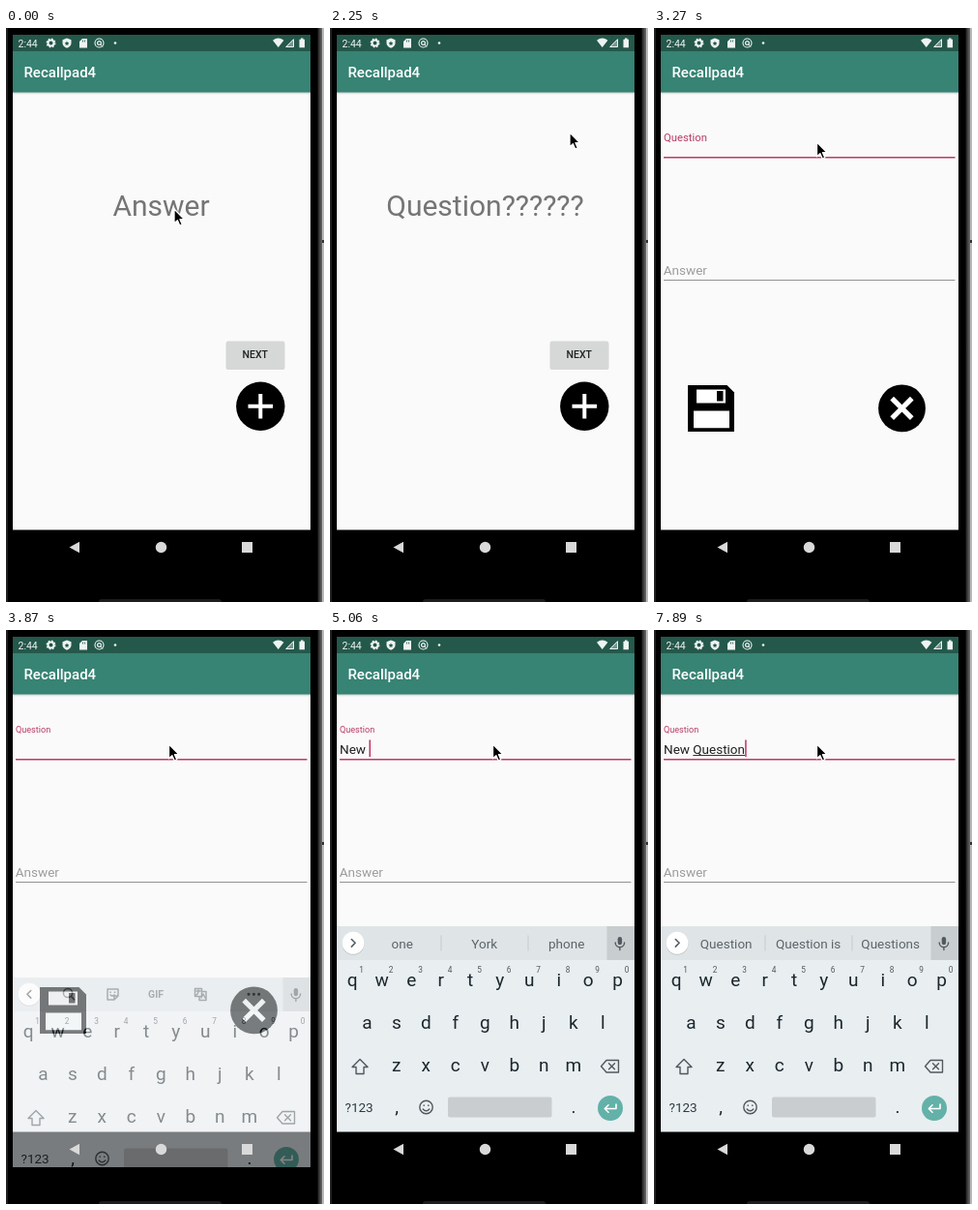
Animation, 329 px wide and 593 px high, one loop 8 s. Source, as an HTML page:

```html
<!DOCTYPE html>
<html lang="en">
<head>
<meta charset="utf-8">
<title>Card app demo</title>
<style>
  html, body { margin: 0; width: 100%; height: 100%; overflow: hidden; background: #000; }
  svg { display: block; width: 100%; height: 100%; }
  text { font-family: Roboto, "Noto Sans", sans-serif; white-space: pre; }
  .mid { text-anchor: middle; }
  .field { font-size: 13.5px; }
  .line { fill: none; stroke-linecap: round; stroke-linejoin: round; }
</style>
</head>
<body>
<svg viewBox="0 0 329 593">
  <defs>
    <clipPath id="screen"><rect x="7" y="7" width="308" height="548"/></clipPath>
    <linearGradient id="shade" x2="0" y2="1">
      <stop offset="0" stop-color="#000" stop-opacity=".2"/>
      <stop offset="1" stop-color="#000" stop-opacity="0"/>
    </linearGradient>
    <linearGradient id="edge">
      <stop offset="0" stop-color="#1c1c1c"/>
      <stop offset="1" stop-color="#6a6a6a"/>
    </linearGradient>
    <g id="window">
      <rect x="7" y="7" width="308" height="548"/>
      <rect x="7" y="24" width="308" height="494.5" fill="#fafafa"/>
      <rect x="7" y="66" width="308" height="3" fill="url(#shade)"/>
      <rect x="7" y="7" width="308" height="17.5" fill="#24584b"/>
      <rect x="7" y="24" width="308" height="42.5" fill="#378374"/>
      <text x="18.5" y="51.3" font-size="15" font-weight="500" fill="#fff">Recallpad4</text>
    </g>
  </defs>

  <!-- phone body -->
  <rect width="329" height="593"/>
  <rect width="2" height="593" fill="#1e1e1e"/>
  <rect x="322.5" width="4.5" height="593" fill="url(#edge)"/>
  <rect x="327" width="2" height="593" fill="#b8b8b8"/>
  <rect x="327" y="219" width="2" height="3" fill="#333"/>
  <rect x="96" y="590" width="127" height="8" rx="3" fill="#1c1c1c"/>

  <g clip-path="url(#screen)">
    <g id="cardView">
      <use href="#window"/>
      <text id="card" class="mid" x="160.5" y="194" font-size="30" fill="#757575"></text>
      <rect x="227.5" y="324" width="61" height="29" rx="2" fill="#000" opacity=".14"/>
      <rect x="228" y="323.5" width="60" height="28" rx="1.5" fill="#d6d7d7"/>
      <text class="mid" x="257.7" y="341.3" font-size="10.5" font-weight="500" fill="#212121">NEXT</text>
      <circle cx="263.3" cy="390.8" r="25.2"/>
      <path d="M250.5 390.8h25.6M263.3 378v25.6" stroke="#fff" stroke-width="4"/>
    </g>

    <g id="formView">
      <use href="#window"/>
      <path id="rule" d="M10 133.7H311.5"/>
      <text id="label" x="10">Question</text>
      <text id="typed" class="field" x="10" y="127.5" fill="#212121"></text>
      <path id="under" stroke="#212121" stroke-width=".9"/>
      <rect id="caret" y="113.5" width="1.5" height="17.5" fill="#c03363"/>
      <text class="field" x="9.8" y="254.7" fill="#9d9d9d">Answer</text>
      <path d="M10 260.5H311.5" stroke="#929292"/>
      <path d="M35 369H75.5L83 376.500V417H35Z"/>
      <path d="M44 373.500H74V387.500H44ZM41 395.500H78V413.300H41Z" fill="#fff"/>
      <rect x="65" y="375" width="6.500" height="10.500"/>
      <circle cx="256.500" cy="392.900" r="24.400"/>
      <path d="M246.200 382.600l20.600 20.600M266.800 382.600l-20.600 20.600" stroke="#fff" stroke-width="5.200"/>
    </g>

    <g id="keyboard">
      <rect x="7" y="306" width="308" height="270" fill="#e9eef1"/>
      <rect x="7" y="306" width="308" height="35" fill="#dfe4e7"/>
      <rect x="286.5" y="306" width="28.5" height="35" fill="#c8cdd0"/>
      <circle cx="24" cy="324" r="11.6" fill="#b9bec1"/>
      <circle cx="24" cy="323.3" r="11.5" fill="#fff"/>
      <path id="chevron" class="line" stroke="#555d62" stroke-width="1.6"/>
      <g fill="#525a5f">
        <rect x="297.7" y="317" width="4.4" height="8.2" rx="2.2"/>
        <path class="line" d="M295.2 323a4.7 4.7 0 0 0 9.4 0M299.9 328v2.5" stroke="#525a5f" stroke-width="1.4"/>
      </g>

      <g id="tools" class="line" stroke="#5f686d" stroke-width="1.5">
        <circle cx="64" cy="322" r="4.6"/><path d="M67.5 325.5l3.2 3.5"/>
        <path d="M105 318h11v7l-4 4h-7ZM112 329v-4h4M108 321v.5M112.5 321v.5M108 324q2 2 4 0"/>
        <path d="M195.5 317.5h7v8h-7ZM202.5 320.5h4.5v9h-7v-4M197 320h4M199 319v1q0 3-2 4M202 327l2-4 2 4"/>
        <path d="M251 323.3h.1M256.3 323.3h.1M261.6 323.3h.1" stroke-width="3"/>
        <text class="mid" x="155" y="327" font-size="10.5" font-weight="700" fill="#5f686d" stroke="none">GIF</text>
      </g>

      <g id="strip">
        <path d="M115 315.5v16M205 315.5v16" stroke="#c5cbce"/>
        <text class="mid field" x="74.7" y="328.5" fill="#5c656a"></text>
        <text class="mid field" x="159.7" y="328.5"></text>
        <text class="mid field" x="244.7" y="328.5" fill="#5c656a"></text>
      </g>

      <g id="keys"></g>

      <g class="line" stroke="#4f595e" stroke-width="1.4">
        <path d="M31 443.5l8 8h-4v7h-8v-7h-4Z"/>
        <path d="M286 444.5h12.5v12.5H286l-5.5-6.2ZM288.5 447.7l6 6M294.5 447.7l-6 6"/>
        <circle cx="99.5" cy="493" r="6.7"/>
        <path d="M97.2 491v.4M101.8 491v.4M96.2 495q3.3 3.5 6.6 0"/>
      </g>
      <text x="15.5" y="498" font-size="13.5" fill="#2c383f">?123</text>
      <rect x="122" y="482.5" width="107.5" height="21" rx="2" fill="#c9cdcf"/>
      <circle cx="290" cy="494" r="13" fill="#63b1a8"/>
      <path class="line" d="M296 490v4.5H284.5M288 490.8l-3.7 3.7 3.7 3.7" stroke="#fff" stroke-width="1.6"/>
    </g>
  </g>

  <rect id="navBack" x="7" y="518.5" width="308" height="37"/>
  <g fill="#d9d9d9">
    <path d="M65.5 536.5L76 530.7V542.3Z"/>
    <circle cx="160.5" cy="536.5" r="5.7"/>
    <rect x="244" y="531" width="11" height="11"/>
  </g>

  <!-- status icons -->
  <g fill="#eef4f2">
    <text x="12.5" y="19.5" font-size="10.5">2:44</text>
    <circle cx="46.5" cy="15.5" r="3" fill="none" stroke="#eef4f2" stroke-width="2"/>
    <circle cx="46.5" cy="15.5" r="4.3" fill="none" stroke="#eef4f2" stroke-width="1.3" stroke-dasharray="1.7 1.677"/>
    <path d="M63 10.5l4.5 1.7v3.3q0 3.5-4.5 5.2-4.5-1.7-4.5-5.2v-3.3Z"/>
    <path d="M63 13.5l.8 1.5 1.6.2-1.2 1.2.3 1.7-1.5-.8-1.5.8.3-1.7-1.2-1.2 1.6-.2Z" fill="#24584b"/>
    <path d="M79 11h5v9.5h-8V14Z"/>
    <path d="M79.5 12.5v2M81.5 12.5v2" stroke="#24584b" stroke-width=".8"/>
    <circle cx="96.5" cy="15.5" r="4.5" fill="none" stroke="#eef4f2" stroke-width="1.1"/>
    <circle cx="96.5" cy="15.5" r="1.9" fill="none" stroke="#eef4f2" stroke-width="1.2"/>
    <path d="M98 17l2 2.5" stroke="#eef4f2"/>
    <circle cx="113" cy="15.5" r="1.3"/>
    <path d="M276 12.7q5.7-4.3 11.4 0L281.7 20Z"/>
    <path d="M298 10.8V20h-9.2Z" opacity=".4"/>
    <path d="M289.8 19.5l7.7-7.7v7.7Z" fill="none" stroke="#eef4f2"/>
    <path d="M303.5 11.7h1.5v-1.2h2.5v1.2h1.5v8.6h-5.5Z"/>
  </g>

  <path id="pointer" d="M0 0V14.8L3.4 11.7 5.7 17 8.3 15.9 6 10.7H10.6Z"
        stroke="#fff" stroke-width="1.3" stroke-linejoin="round"/>
</svg>

<script>
const LOOP = 8000, STEP = 148;
const $ = id => document.getElementById(id);
const set = (node, attrs) => { for (const k in attrs) node.setAttribute(k, attrs[k]); };
const show = (node, on) => { node.style.display = on ? '' : 'none'; };
const mix = (a, b, p) => a + (b - a) * p;

// Latest entry whose time has come: [time, value]
const at = (track, t) => track.reduce((v, e) => (e[0] <= t ? e[1] : v), track[0][1]);

// Pointer legs: start time, steps, destination
const legs = [[600, 6, 267, 374], [2100, 2, 248, 108], [2400, 2, 205, 126], [2690, 4, 168.5, 118]];

// Window scales during the screen change: [old, new]
const scales = [[0, [1, 0]], [2400, [1.04, 0.97]], [2550, [1.05, 0.995]], [2690, [1, 1]]];

const floatLabel = [[0, 0], [3270, 0.5], [3420, 1]];

// Text before the composing word, then the word itself
const typing = [
  [0, ['', '']], [4310, ['', 'N']], [4760, ['', 'Ne']], [4910, ['', 'New']], [5060, ['New ', '']],
  [6250, ['New ', 'Q']], [6700, ['New ', 'Qu']], [6990, ['New ', 'Que']], [7140, ['New ', 'Ques']],
  [7440, ['New ', 'Quest']], [7590, ['New ', 'Questi']], [7740, ['New ', 'Questio']], [7890, ['New ', 'Question']]
];

// Three suggestions; a leading * marks the bold one
const hints = [
  [0, ''], [4460, 'N|No|Not'], [4760, 'Ne|New|Need'], [4910, 'New|News|Never'], [5060, 'one|York|phone'],
  [6400, 'Q|Quote|Question'], [6840, 'Qu|*Quote|Question'], [7140, 'Ques|*Question|Questions'],
  [7440, 'Quest|*Question|Questions'], [7740, 'Questio|*Question|Questions'],
  [7890, 'Question|Question is|Questions']
];

const caretOn = [[0, 0], [3420, 1], [3870, 0], [4310, 1], [5510, 0], [5950, 1]];

function key(ch, x, y, size = 19, fill = '#1b272d') {
  return `<text class="mid" x="${x}" y="${y}" font-size="${size}" fill="${fill}">${ch}</text>`;
}

function buildKeys() {
  const rows = [['qwertyuiop', 23.2, 368], ['asdfghjkl', 38.3, 411.5], ['zxcvbnm', 68.8, 456]];
  let out = key(',', 69, 498.5) + key('.', 252, 498.5);
  for (const [chars, x, y] of rows)
    [...chars].forEach((ch, i) => {
      out += key(ch, x + 30.5 * i, y);
      if (y < 400) out += key((i + 1) % 10, x + 9.3 + 30.5 * i, 353.7, 8.3, '#4f595e');
    });
  $('keys').innerHTML = out;
}

function movePointer(t) {
  let x = 174, y = 187;
  for (const [start, steps, toX, toY] of legs) {
    if (t < start) break;
    const p = Math.min(steps, Math.floor((t - start) / STEP) + 1) / steps;
    const e = p * (2 - p);
    x = mix(x, toX, e);
    y = mix(y, toY, e);
  }
  set($('pointer'), { transform: `translate(${x} ${y})` });
}

function zoom(node, s) {
  set(node, { transform: `translate(161 281) scale(${s}) translate(-161 -281)` });
}

function drawWindows(t) {
  const [oldScale, newScale] = at(scales, t);
  show($('cardView'), t < 2690);
  show($('formView'), newScale > 0);
  zoom($('cardView'), oldScale);
  zoom($('formView'), newScale || 1);
  $('card').textContent = t < 150 ? 'Answer' : 'Question??????';
}

function drawField(t) {
  const p = at(floatLabel, t), active = p > 0;
  set($('label'), {
    y: mix(127.5, 106.2, p), 'font-size': mix(13.5, 9.1, p), fill: active ? '#b83a65' : '#9d9d9d'
  });
  set($('rule'), { stroke: active ? '#c03a66' : '#929292', 'stroke-width': active ? 1.5 : 1 });

  const [done, word] = at(typing, t), typed = $('typed');
  typed.textContent = done + word;
  const width = n => (n ? typed.getSubStringLength(0, n) : 0);
  const end = 10 + width(done.length + word.length);
  set($('under'), { d: word ? `M${10 + width(done.length)} 129.5H${end}` : 'M0 0' });
  set($('caret'), { x: end + 0.2 });
  show($('caret'), at(caretOn, t));
}

function drawKeyboard(t) {
  const sliding = t < 4010, words = at(hints, t);
  show($('keyboard'), t >= 3870);
  set($('keyboard'), { transform: `translate(0 ${sliding ? 53 : 0})`, opacity: sliding ? 0.52 : 1 });
  show($('navBack'), t >= 4010);
  show($('tools'), !words);
  show($('strip'), words);
  set($('chevron'), { d: words ? 'M22.3 319.5l3.8 3.8-3.8 3.8' : 'M25.7 319.5l-3.8 3.8 3.8 3.8' });
  const slots = $('strip').querySelectorAll('text');
  words.split('|').forEach((w, i) => { slots[i].textContent = w.replace('*', ''); });
  const bold = words.includes('*');
  set(slots[1], { 'font-weight': bold ? 700 : 400, fill: bold ? '#000' : '#5c656a' });
}

function draw(t) {
  drawWindows(t);
  drawField(t);
  drawKeyboard(t);
  movePointer(t);
}

function tick() {
  draw(performance.now() % LOOP);
  requestAnimationFrame(tick);
}

buildKeys();
tick();
</script>
</body>
</html>
```
